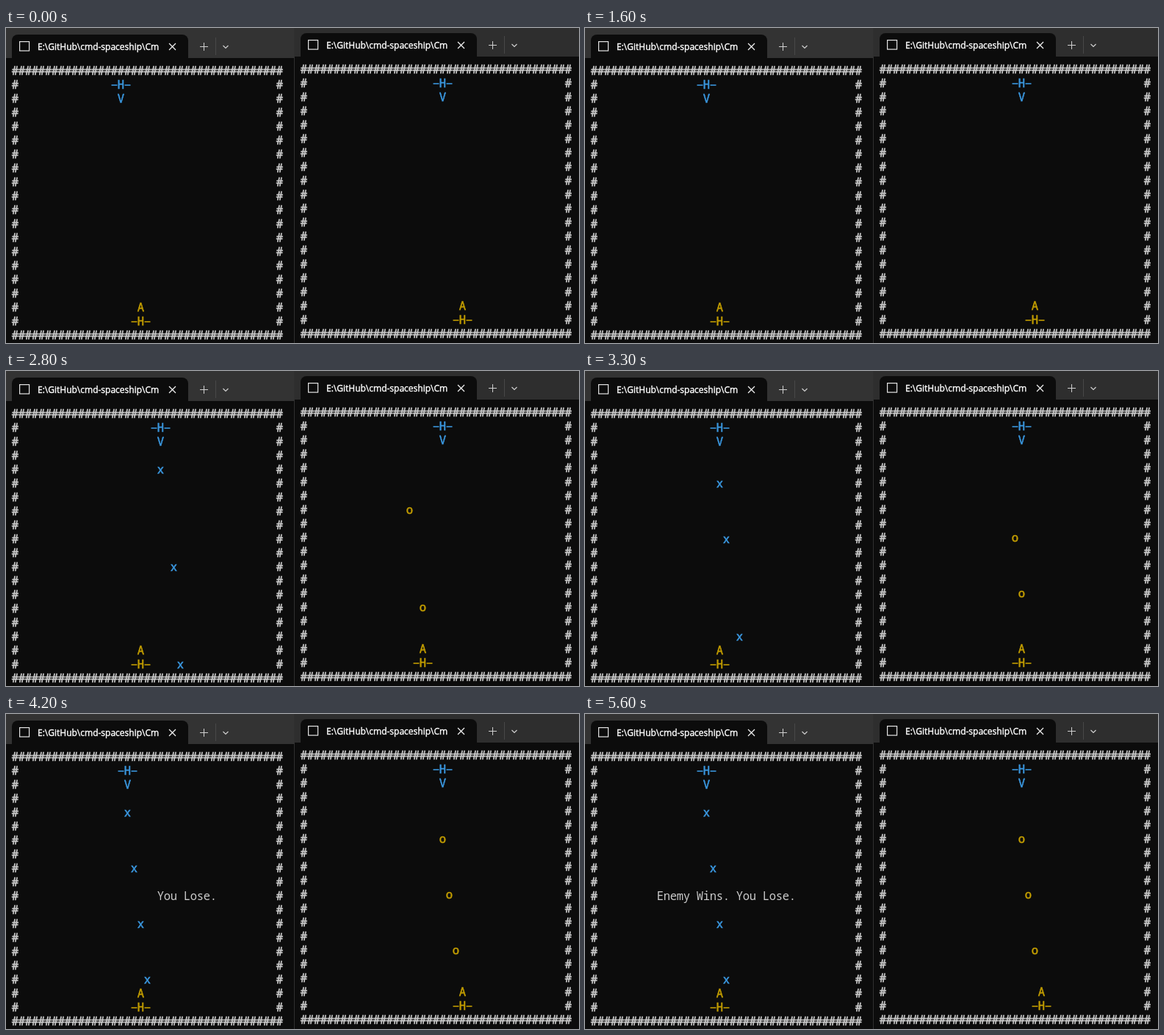
These frames come from a looping animation (780 px wide and 430 px high, 5700 ms). An HTML page with a canvas:

```html
<!DOCTYPE html>
<html lang="en">
<head>
<meta charset="utf-8">
<title>Spaceship duel</title>
<style>
html, body { margin: 0; width: 780px; height: 430px; overflow: hidden; background: #0c0c0c; }
canvas { display: block; }
</style>
</head>
<body>
<canvas id="stage" width="780" height="430"></canvas>
<script>
const ctx = document.getElementById('stage').getContext('2d');
const LOOP = 5700, TICK = 100, END = 3600, ROW_MS = 400 / 9;
const COLS = 41, ROWS = 20, CELL_W = 9, CELL_H = 19;
const BG = '#0c0c0c', GREY = '#cccccc', BLUE = '#3a96dd', GOLD = '#c19c00';
const PATH = 'E:\\GitHub\\cmd-spaceship\\Cm';

// Turning points of the player's flight: [ms, column]
const path = [[0, 24], [300, 24], [900, 28], [1200, 25], [1500, 25], [2000, 15], [2300, 15], [3700, 24]];

function playerCol(t) {
  const i = path.findIndex(([at]) => at > t);
  if (i < 0) return path[path.length - 1][1];
  const [t0, c0] = path[i - 1], [t1, c1] = path[i];
  return Math.round(c0 + (c1 - c0) * (t - t0) / (t1 - t0));
}

// One early shot, a slow volley, then a fast one
const every = (start, step, count) => Array.from({ length: count }, (_, i) => start + i * step);
const shots = [573, ...every(1812, 302, 5), ...every(3198, 178, 3)]
  .map(at => ({ at, col: playerCol(at) }));

// Rows flown from the enemy's edge, starting just ahead of the ship
const flown = (shot, t) => 3 + (t - shot.at) / ROW_MS;

function put(text, col, row, color, weight = 0.6) {
  ctx.font = '15.5px "Noto Sans Mono", "DejaVu Sans Mono", monospace';
  ctx.textAlign = 'center';
  ctx.lineWidth = weight;
  [...text].forEach((ch, i) => {
    const x = 8 + (col + i) * CELL_W, y = 59 + row * CELL_H;
    ctx.fillStyle = BG;
    ctx.fillRect(x, y - 9, CELL_W, CELL_H);
    ctx.fillStyle = ctx.strokeStyle = color;
    if (ch === '─') {
      ctx.fillRect(x + 0.5, y - 0.8, 8, 1.6);
    } else {
      ctx.fillText(ch, x + 4.5, y + 5);
      if (weight) ctx.strokeText(ch, x + 4.5, y + 5);
    }
  });
}

function line(color, width, ...pts) {
  ctx.strokeStyle = color;
  ctx.lineWidth = width;
  ctx.beginPath();
  pts.forEach(([x, y], i) => i ? ctx.lineTo(x, y) : ctx.moveTo(x, y));
  ctx.stroke();
}

function chrome(bar) {
  ctx.fillStyle = BG;
  ctx.fillRect(0, 0, 393, 440);
  ctx.fillStyle = bar;
  ctx.fillRect(0, 0, 393, 41);
  ctx.fillStyle = BG;
  ctx.beginPath();
  ctx.roundRect(8, 9, 240, 33, [8, 8, 0, 0]);
  ctx.fill();

  ctx.strokeStyle = '#e4e4e4';
  ctx.lineWidth = 1.2;
  ctx.strokeRect(18.6, 18.6, 13, 12.5);

  ctx.fillStyle = ctx.strokeStyle = '#ffffff';
  ctx.textAlign = 'left';
  ctx.font = '12px "Open Sans", "Noto Sans", sans-serif';
  ctx.lineWidth = 0.4;
  ctx.fillText(PATH, 43, 30);
  ctx.strokeText(PATH, 43, 30);

  line('#f0f0f0', 1.2, [222, 21], [231, 30]);
  line('#f0f0f0', 1.2, [231, 21], [222, 30]);
  line('#d0d0d0', 1, [264, 25.5], [275, 25.5]);
  line('#d0d0d0', 1, [269.5, 20], [269.5, 31]);
  line('#484848', 1, [285.5, 13], [285.5, 37]);
  line('#d0d0d0', 1.2, [295.5, 24], [299, 27.5], [302.5, 24]);
}

function field(blueCol, goldCol) {
  for (let r = 0; r < ROWS; r++) {
    const wall = r % (ROWS - 1) === 0;
    for (let c = 0; c < COLS; c += wall ? 1 : COLS - 1) put('#', c, r, GREY);
  }
  put('─H─', blueCol - 1, 1, BLUE);
  put('V', blueCol, 2, BLUE);
  put('A', goldCol, 17, GOLD);
  put('─H─', goldCol - 1, 18, GOLD);
}

function leftWindow(k, t) {
  const now = Math.min(t, END);
  chrome('#333333');
  field(40 - playerCol(now), 19);
  for (const shot of shots) {
    const v = flown(shot, now);
    if (v >= 3 && v < 20.5) put('x', 40 - shot.col, Math.min(19, Math.floor(v)), BLUE);
  }
  if (t < END) return;
  const text = 'Enemy Wins. You Lose.';
  if (k % 3) put(text, 10, 10, GREY, 0);
  else if (k % 6 === 0) put(text.slice(12), 22, 10, GREY, 0); // half redrawn
}

function rightWindow(k, t) {
  const now = Math.min(t, END);
  chrome('#2e2e2e');
  field(21, playerCol(t));
  for (const shot of shots) {
    const v = flown(shot, now);
    if (v >= 3 && v < 16) put('o', shot.col, 18 - Math.floor(v), GOLD);
  }
  if (t >= END && k % 2) put('You hit the enemy. You won.', 7, 10, GREY, 0);
}

function draw(ms) {
  const k = Math.floor(ms % LOOP / TICK), t = k * TICK;
  leftWindow(k, t);
  ctx.save();
  ctx.translate(393, -2);
  rightWindow(k, t);
  ctx.restore();
  ctx.fillStyle = '#303030';
  ctx.fillRect(392, 0, 1, 430);
}

let begin = null;
function frame(now) {
  if (begin === null) begin = now;
  draw(now - begin);
  requestAnimationFrame(frame);
}
draw(0);
requestAnimationFrame(frame);
</script>
</body>
</html>
```
